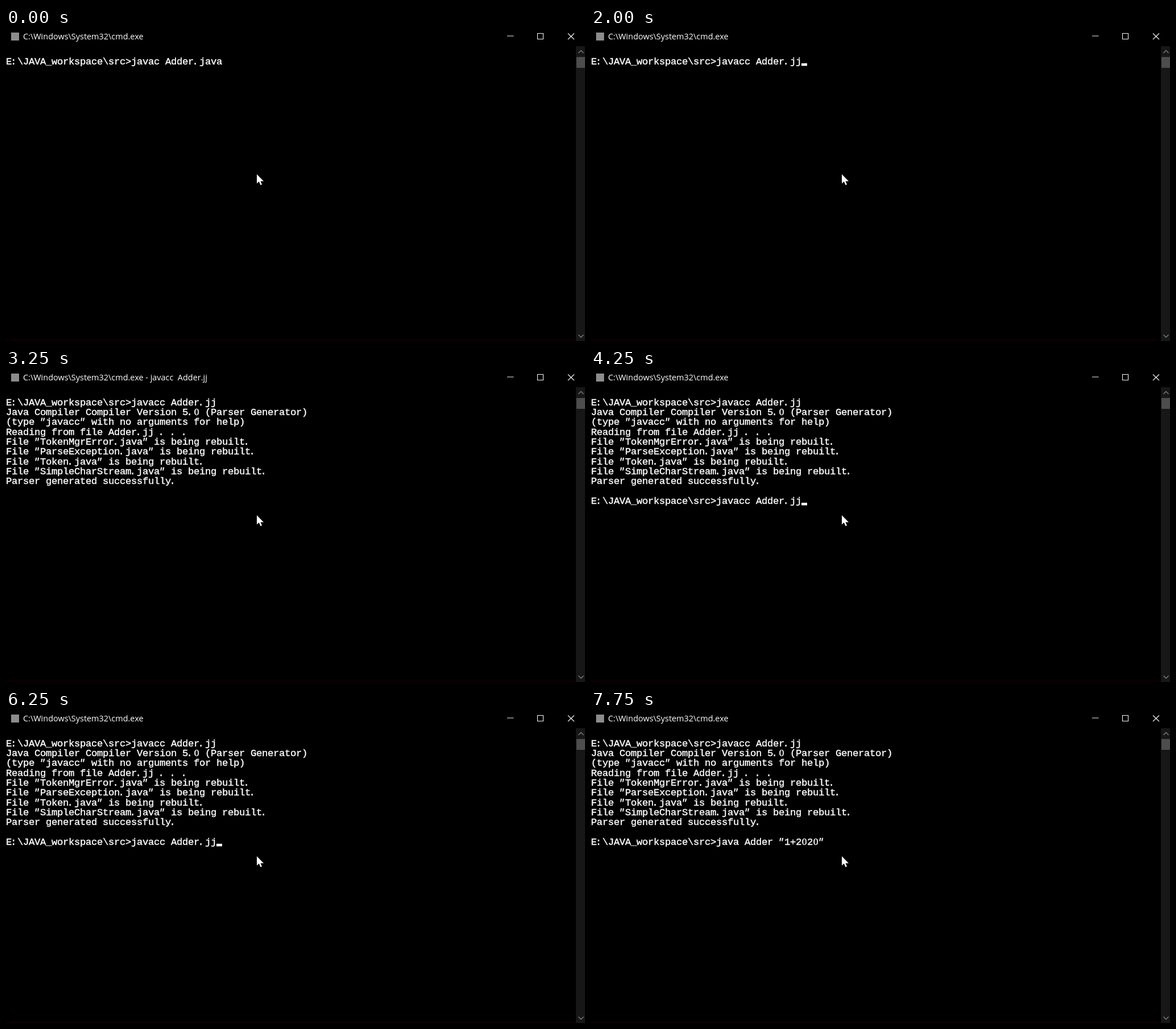
An HTML page for the animation above (8000 ms loop, 1018 by 550 pixels).

```html
<!DOCTYPE html>
<html lang="en">
<head>
<meta charset="utf-8">
<title>Console</title>
<style>
  html, body { margin: 0; width: 100%; height: 100%; overflow: hidden; background: #000; }
  svg { display: block; width: 100%; height: 100%; }
  text { white-space: pre; fill: #fff; }
  #title { font: 14.45px "Open Sans", "Noto Sans", sans-serif; }
  #screen text { font: 17.3px "Liberation Mono", monospace; stroke: #fff; stroke-width: .4; }
  #screen .quote { font-style: italic; }
  #screen .zero { font-family: "Liberation Serif", serif; font-size: 17.6px; }
  .line { fill: none; stroke: #f4f4f4; stroke-width: 1.1; }
  .arrow { fill: none; stroke: #7c7c7c; stroke-width: 1.4; }
</style>
</head>
<body>
<svg viewBox="0 0 1018 550" preserveAspectRatio="none">
  <rect width="1018" height="550"/>
  <rect y="547" width="1002" height="3" fill="#090006"/>

  <rect x="9" y="8" width="14" height="14" fill="#8c8c8c"/>
  <text id="title" x="30" y="20"></text>
  <path class="line" d="M881 14H892.5M934.5 9.5H944.5V19.5H934.5ZM988 9.5L999 20M999 9.5L988 20"/>

  <rect x="1002" y="32" width="16" height="518" fill="#171717"/>
  <rect x="1003" y="51" width="15" height="19" fill="#4d4d4d"/>
  <path class="arrow" d="M1006.5 44L1011 39.5L1015.5 44M1006.5 539L1011 543.5L1015.5 539"/>

  <g id="screen"></g>
  <rect id="cursor" width="10" height="4.5" fill="#fff"/>
  <path fill="#fff" d="M441 257V273.3L444.8 269.8L447.5 276L450 275L447.5 269.2H453Z"/>
</svg>
<script>
const LOOP = 8000, CELL = 10, ROW = 17.3, BASE = 63.8;
const NS = "http://www.w3.org/2000/svg";
const PROMPT = "E:\\JAVA_workspace\\src>";
const PATH = "C:\\Windows\\System32\\cmd.exe";
const BUILD = "javacc Adder.jj";
const RUN = 'java Adder "1+2020"';
const OUTPUT = [
  "Java Compiler Compiler Version 5.0 (Parser Generator)",
  '(type "javacc" with no arguments for help)',
  "Reading from file Adder.jj . . .",
  'File "TokenMgrError.java" is being rebuilt.',
  'File "ParseException.java" is being rebuilt.',
  'File "Token.java" is being rebuilt.',
  'File "SimpleCharStream.java" is being rebuilt.',
  "Parser generated successfully."
];
// Glyphs that sit off-centre in their cell
const SHIFT = { ".": -2.5, ":": -2, '"': -1.5, "0": 0.8 };

const first = [PROMPT + BUILD];
const done = [...first, ...OUTPUT];
const ask = cmd => [...done, "", PROMPT + cmd];

// [start ms, lines, cursor shown, program running]
const STEPS = [
  [0, [PROMPT + "javac Adder.java"], false],
  [250, first, true],
  [500, first, false],
  [1000, first, true],
  [1500, first, false],
  [2000, first, true],
  [2500, first, false],
  [2750, [...first, ""], true, true],
  [3000, [...first, ""], false, true],
  [3250, done, false, true],
  [3500, ask(""), true],
  [4250, ask(BUILD), true],
  [4500, ask("cls"), true],
  [4750, ask(BUILD), true],
  [5250, ask(BUILD), false],
  [5750, ask(BUILD), true],
  [6750, ask(BUILD), false],
  [7000, ask("cls"), true],
  [7250, ask(RUN), true],
  [7750, ask(RUN), false]
];

const title = document.getElementById("title");
const screen = document.getElementById("screen");
const cursor = document.getElementById("cursor");

function make(tag, attrs, parent) {
  const el = document.createElementNS(NS, tag);
  for (const key in attrs) el.setAttribute(key, attrs[key]);
  return parent.appendChild(el);
}

function drawLine(line, row) {
  const text = make("text", { y: BASE + row * ROW }, screen);
  let col = 0;
  for (const part of line.split(/(["0])/)) {
    if (!part) continue;
    const x = [...part].map((ch, i) => (col + i) * CELL + (SHIFT[ch] || 0));
    const style = part === '"' ? "quote" : part === "0" ? "zero" : "plain";
    make("tspan", { x: x.join(" "), class: style }, text).textContent = part;
    col += part.length;
  }
}

let shown;
function draw(time) {
  const step = STEPS.findLast(s => s[0] <= time);
  if (step === shown) return;
  shown = step;
  const [, lines, blink, busy] = step;
  title.textContent = PATH + (busy ? " - javacc  Adder.jj" : "");
  screen.replaceChildren();
  lines.forEach(drawLine);
  cursor.setAttribute("x", lines.at(-1).length * CELL);
  cursor.setAttribute("y", 62 + (lines.length - 1) * ROW);
  cursor.setAttribute("visibility", blink ? "visible" : "hidden");
}

const start = performance.now();
function tick() {
  draw((performance.now() - start) % LOOP);
  requestAnimationFrame(tick);
}
tick();
</script>
</body>
</html>
```
